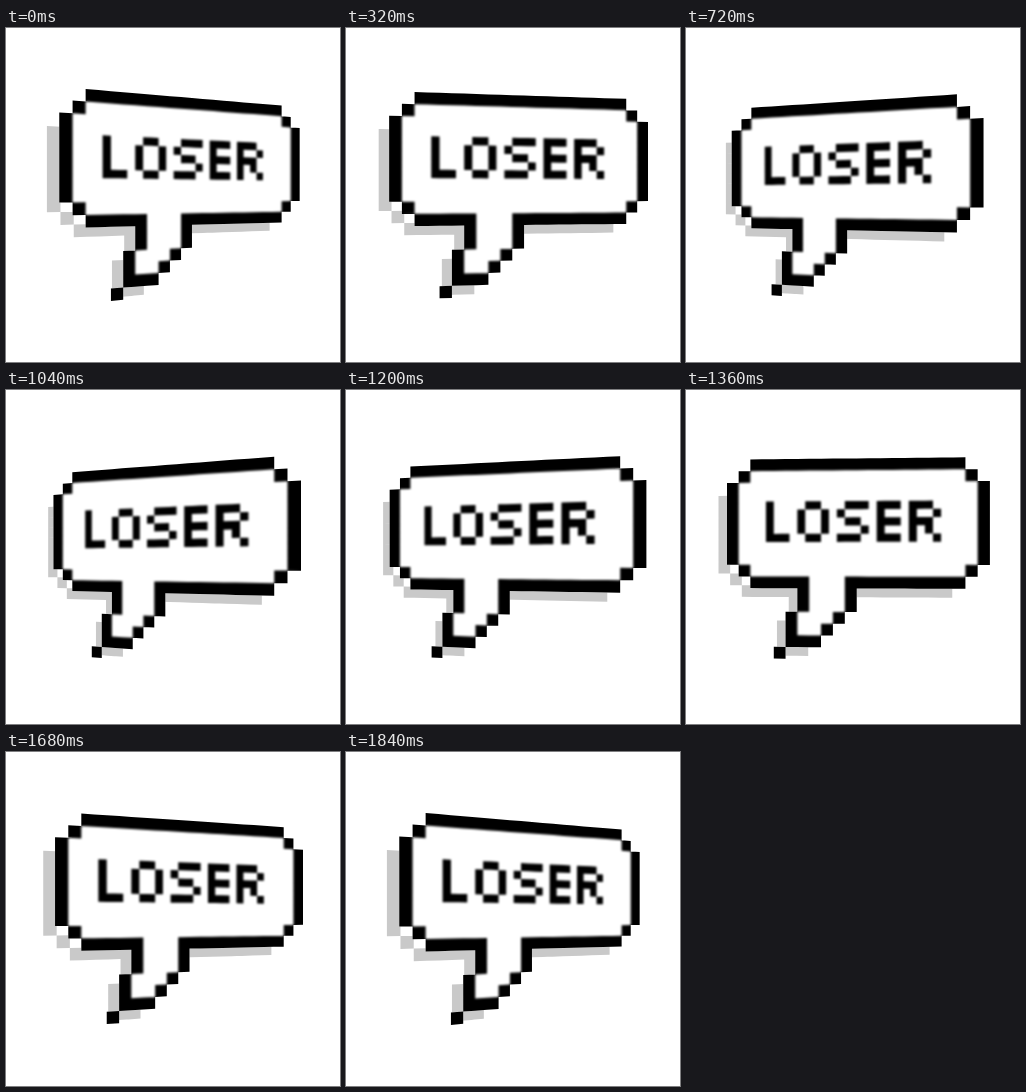
Animation, 334 px wide and 334 px high, one loop 1920 ms. Source, as an HTML page with a canvas:

```html
<!DOCTYPE html>
<html lang="en">
<head>
<meta charset="utf-8">
<title>Speech bubble</title>
<style>
html, body { margin: 0; width: 100%; height: 100%; overflow: hidden; background: #fff; }
canvas { display: block; }
</style>
</head>
<body>
<canvas id="stage" width="334" height="334" role="img" aria-label="LOSER"></canvas>
<script>
const ctx = document.getElementById('stage').getContext('2d');
const SIZE = 334, VIEW = 410, DEPTH = 43, STEP = 80, STEPS = 24;

// Cells passed when walking straight from point to point
function walk(points) {
  const cells = [points[0]];
  for (let i = 1; i < points.length; i++) {
    const [x, y] = points[i - 1], dx = points[i][0] - x, dy = points[i][1] - y;
    const n = Math.ceil(Math.max(Math.abs(dx), Math.abs(dy)));
    for (let k = 1; k <= n; k++) cells.push([x + dx * k / n, y + dy * k / n]);
  }
  return cells;
}
const parse = text => text.split(' ').map(p => p.split(',').map(Number));

// Clockwise, one cell wide
const edge = parse('2,0 19,0 20,1 21,2 21,8 20,9 19,10 10,10 10,12 7,15 5,15 ' +
  '4,16 5,15 5,13 6,12 6,10 2,10 1,9 0,8 0,2 1,1 2,0');
const border = walk(edge);
const shade = ['18.65,10 11,10', '6.65,15 5,15 5,13 6,12 6,10 2,10 1,9 0,8 0,2.35']
  .flatMap(s => walk(parse(s)))
  .map(([x, y]) => [x - .75, y + .75]);

// Pen strokes of each letter, four cells wide at most, one cell apart
const word = [
  ['0,0 0,4 2,4'],
  ['1,0 2,0 3,1 3,3 2,4 1,4 0,3 0,1'],
  ['3,0 1,0 0,1 1,2 2,2 3,3 2,4 0,4'],
  ['2,0 0,0 0,4 2,4', '0,2 2,2'],
  ['0,4 0,0 2,0 3,1 2,2 0,2', '2,2 2,3 3,4']
];
let left = 0;
const letters = word.flatMap(strokes => {
  const cells = strokes.flatMap(s => walk(parse(s))).map(([x, y]) => [x + left, y]);
  left = Math.max(...cells.map(c => c[0])) + 2;
  return cells;
});

const bubbleGrid = { x: -127, y: -99.8, w: 12, h: 11.87 };
const letterGrid = { x: -87, y: -57, w: 8, h: 8.2 };

function draw(step) {
  const swing = Math.cos(2 * Math.PI * (step + .5) / STEPS);
  const angle = (.2 + 19.4 * swing) * Math.PI / 180;
  const sin = Math.sin(angle), cos = Math.cos(angle);
  const drop = .3 - 3.4 * swing + 3 * swing * swing;

  const project = (grid, x, y, depth) => {
    const u = grid.x + x * grid.w, v = grid.y + y * grid.h;
    const far = 1.004 + (u * sin + 160 * (1 - cos)) / VIEW;
    return [SIZE / 2 + .5 + (u * cos + depth * sin) / far, SIZE / 2 + drop + v / far];
  };
  const polygon = (path, points, grid, depth = DEPTH) => {
    points.forEach(([x, y], i) => {
      const p = project(grid, x, y, depth);
      i ? path.lineTo(...p) : path.moveTo(...p);
    });
    path.closePath();
  };
  const addCells = (path, cells, grid, depth) => {
    for (const [x, y] of cells)
      polygon(path, [[x, y], [x + 1, y], [x + 1, y + 1], [x, y + 1]], grid, depth);
  };

  ctx.fillStyle = '#fff';
  ctx.fillRect(0, 0, SIZE, SIZE);

  const shadow = new Path2D();
  addCells(shadow, shade, bubbleGrid, DEPTH - 6);
  ctx.fillStyle = '#c9c9c9';
  ctx.fill(shadow);

  const middle = edge.map(([x, y]) => [x + .5, y + .5]);
  const outside = new Path2D();
  addCells(outside, border, bubbleGrid);
  polygon(outside, middle, bubbleGrid);

  // All ink: everything but the inside of the bubble, plus the letters
  const ink = new Path2D();
  ink.rect(-20, -20, SIZE + 40, SIZE + 40);
  polygon(ink, middle.reverse(), bubbleGrid);
  addCells(ink, border, bubbleGrid);
  addCells(ink, letters, letterGrid);

  // Sharp outer edge, soft inner edges
  ctx.save();
  ctx.clip(outside);
  ctx.fillStyle = '#fff';
  ctx.fillRect(0, 0, SIZE, SIZE);
  ctx.filter = 'blur(1px)';
  ctx.fillStyle = '#000';
  ctx.fill(ink);
  ctx.restore();
}

const start = performance.now();
function tick() {
  draw(Math.floor((performance.now() - start) / STEP) % STEPS);
  requestAnimationFrame(tick);
}
tick();
</script>
</body>
</html>
```
